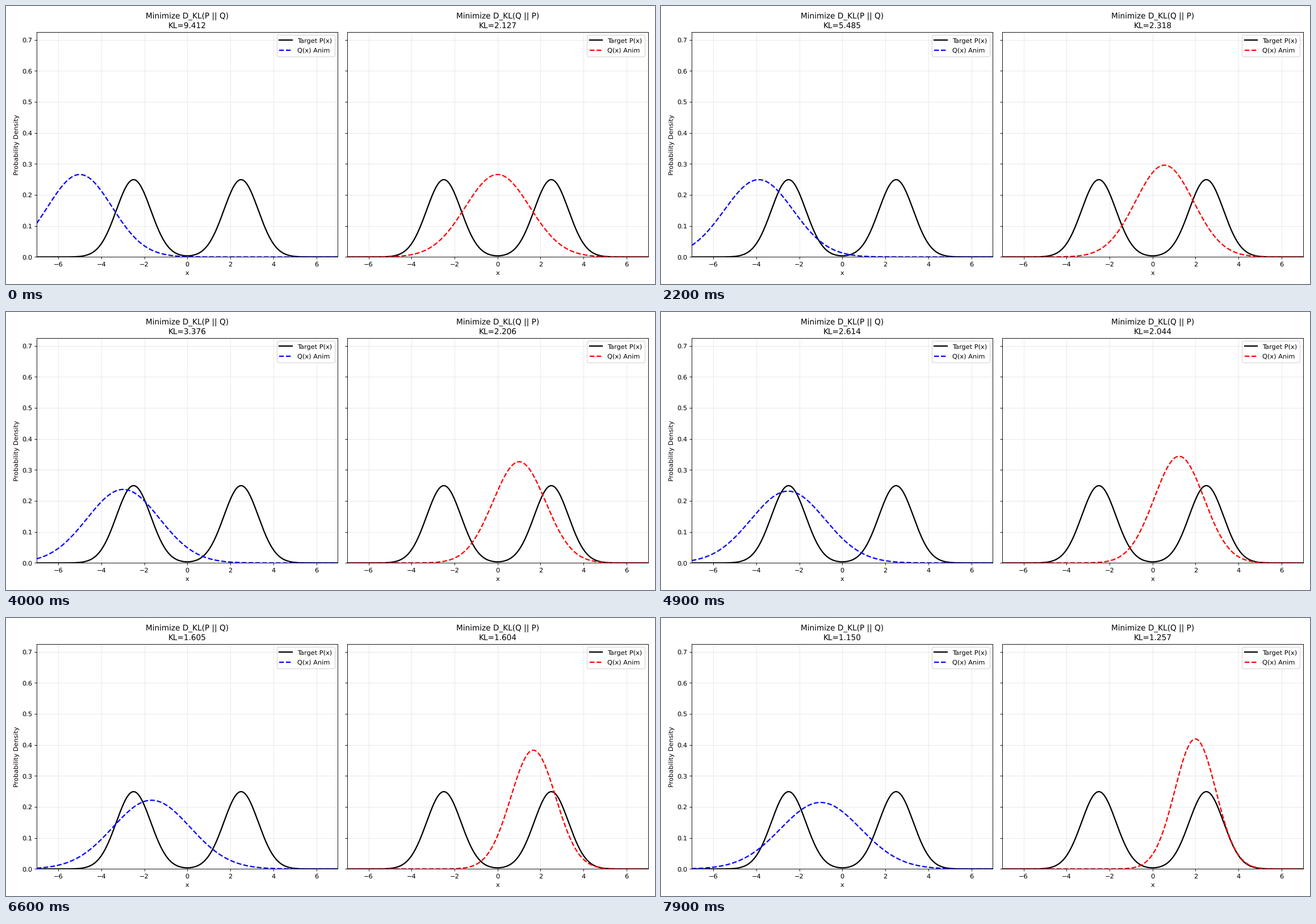
These frames come from a looping animation (1143 by 490 pixels, 8 s). A matplotlib script:

```python
import numpy as np
import matplotlib.pyplot as plt
from matplotlib.animation import FuncAnimation

W, H = 1143, 490
DPI = H / 6
FRAMES, INTERVAL = 80, 100
PATH_STEPS = 99  # steps from the start pose to the end pose
EPS = 1e-12

x = np.linspace(-10, 10, 2000)
dx = x[1] - x[0]


def gauss(mu, sigma):
    return np.exp(-0.5 * ((x - mu) / sigma) ** 2) / (sigma * np.sqrt(2 * np.pi))


def kl_bits(a, b):
    a, b = a / (a.sum() * dx), b / (b.sum() * dx)
    return np.sum(a * np.log2((a + EPS) / (b + EPS))) * dx


target = 0.5 * gauss(-2.5, 0.8) + 0.5 * gauss(2.5, 0.8)

plt.rcParams.update({"font.family": "DejaVu Sans", "text.hinting": "none"})
# The tiny surplus keeps the pixel width from being rounded down.
fig, axes = plt.subplots(1, 2, sharey=True, figsize=((W + 1e-6) / DPI, H / DPI), dpi=DPI)
fig.subplots_adjust(left=54.3 / W, right=1130.8 / W, bottom=1 - 442.4 / H,
                    top=1 - 45.8 / H, wspace=0.0307)


class Panel:
    """One fit: (mu, sigma) moves in a straight line from start to end."""

    def __init__(self, ax, name, color, start, end, divergence):
        self.ax, self.name, self.divergence = ax, name, divergence
        self.start, self.end = np.array(start), np.array(end)
        ax.plot(x, target, color="black", lw=2, label="Target P(x)")
        self.line, = ax.plot(x, gauss(*start), color=color, ls="--", lw=2,
                             label="Q(x) Anim")
        ax.set_xlim(-7, 7)
        ax.set_ylim(0, 0.7254)
        ax.set_xlabel("x")
        ax.grid(True, alpha=0.3)
        ax.legend(loc="upper right", labelspacing=0.6)

    def update(self, t):
        q = gauss(*(self.start + (self.end - self.start) * t))
        self.line.set_ydata(q)
        self.ax.set_title(f"Minimize {self.name}\nKL={self.divergence(q):.3f}")


panels = [
    Panel(axes[0], "D_KL(P || Q)", "blue", (-5, 1.5), (0, 1.95),
          lambda q: kl_bits(target, q)),
    Panel(axes[1], "D_KL(Q || P)", "red", (0, 1.5), (2.492, 0.8125),
          lambda q: kl_bits(q, target)),
]
axes[0].set_ylabel("Probability Density")


def draw(i):
    for panel in panels:
        panel.update(i / PATH_STEPS)
    return [panel.line for panel in panels]


anim = FuncAnimation(fig, draw, frames=FRAMES, interval=INTERVAL,
                     repeat=True, repeat_delay=0)
plt.show()
```
